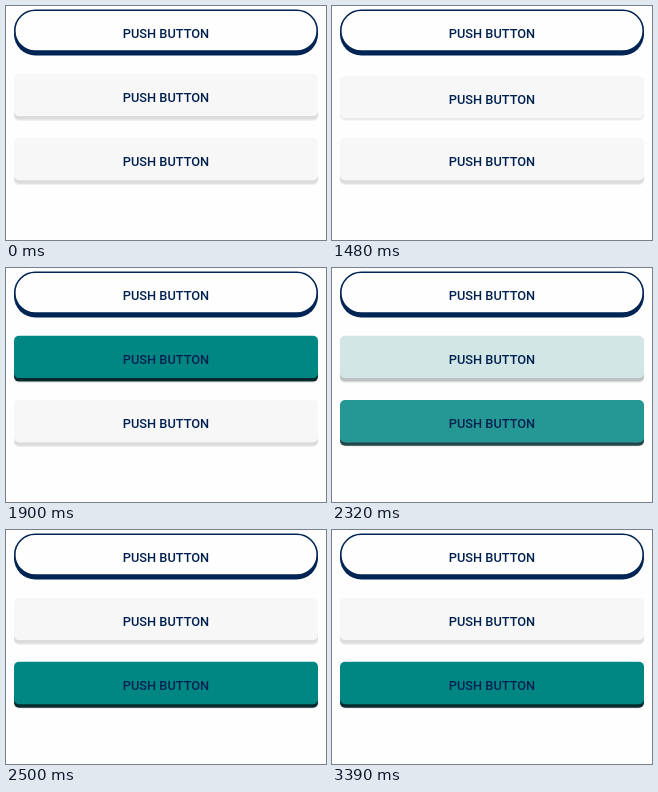
An HTML page that plays this animation: 320x234 px, repeating every 4.16 s.

```html
<!DOCTYPE html>
<html lang="en">
<head>
<meta charset="utf-8">
<title>Push buttons</title>
<style>
  html, body { margin: 0; width: 100%; height: 100%; overflow: hidden; background: #fefefe; }
  svg { display: block; width: 100vw; height: 100vh; }
  text { font: 500 12.8px Roboto, Arial, sans-serif; text-anchor: middle; fill: #002150; }
</style>
</head>
<body>
<svg id="stage" viewBox="0 0 320 234"></svg>
<script>
const LOOP = 4160, HEIGHT = 42.4, DEPTH = 3.5, TRAVEL = 3;
const NAVY = '#002454';
const GREY = { face: [247, 247, 248], edge: [220, 220, 221] };
const TEAL = { face: [0, 135, 131], edge: [4, 42, 45] };

// Each track lists [start in ms, value]; values hold until the next entry.
const buttons = [
  { y: 3.5, pill: true,
    press: [[0, 0], [70, .75], [140, 1], [280, .7], [350, .3], [420, 0]],
    active: [[0, 0]] },
  { y: 67.7,
    press: [[0, 0], [1480, .83], [1550, .4], [1620, 0]],
    active: [[0, 0], [1550, .6], [1620, 1], [2250, .6], [2320, .15], [2410, 0]] },
  { y: 131.8,
    press: [[0, 0], [2180, .83], [2250, .5], [2320, .1], [2410, 0],
            [3110, 1], [3250, .8], [3320, .35], [3390, 0]],
    active: [[0, 0], [2250, .4], [2320, .85], [2410, 1]] }
];

const stage = document.getElementById('stage');

function add(name, attrs, parent) {
  const el = document.createElementNS('http://www.w3.org/2000/svg', name);
  set(el, attrs);
  return parent.appendChild(el);
}

function set(el, attrs) {
  for (const key in attrs) el.setAttribute(key, attrs[key]);
}

function valueAt(track, t) {
  let value = track[0][1];
  for (const [start, v] of track) if (t >= start) value = v;
  return value;
}

function mix(a, b, k) {
  return `rgb(${a.map((v, i) => Math.round(v + (b[i] - v) * k))})`;
}

for (const b of buttons) {
  const group = add('g', {}, stage);
  const box = { x: 8, width: 304, height: HEIGHT, rx: b.pill ? HEIGHT / 2 : 5 };
  if (!b.pill) b.soft = add('rect', { ...box, fill: '#000', opacity: .06 }, group);
  b.edge = add('rect', { ...box, fill: NAVY }, group);
  b.face = add('rect', box, group);
  if (b.pill) set(b.face, {
    x: 8.8, width: 302.4, height: HEIGHT - 1.6, rx: HEIGHT / 2 - .8,
    fill: '#fefefe', stroke: NAVY, 'stroke-width': 1.6
  });
  b.label = add('text', { x: 160 }, group);
  b.label.textContent = 'PUSH BUTTON';
}

function draw(t) {
  for (const b of buttons) {
    const d = valueAt(b.press, t), k = valueAt(b.active, t);
    const top = b.y + TRAVEL * d;
    const bottom = b.y + DEPTH - (DEPTH - TRAVEL) * d;
    set(b.edge, { y: bottom });
    set(b.face, { y: b.pill ? top + .8 : top });
    set(b.label, { y: top + 28 });
    if (b.pill) continue;
    set(b.soft, { y: bottom + 1.4 });
    set(b.edge, { fill: mix(GREY.edge, TEAL.edge, k) });
    set(b.face, { fill: mix(GREY.face, TEAL.face, k) });
  }
}

const begin = performance.now();
function tick() {
  draw((performance.now() - begin) % LOOP);
  requestAnimationFrame(tick);
}
tick();
</script>
</body>
</html>
```
